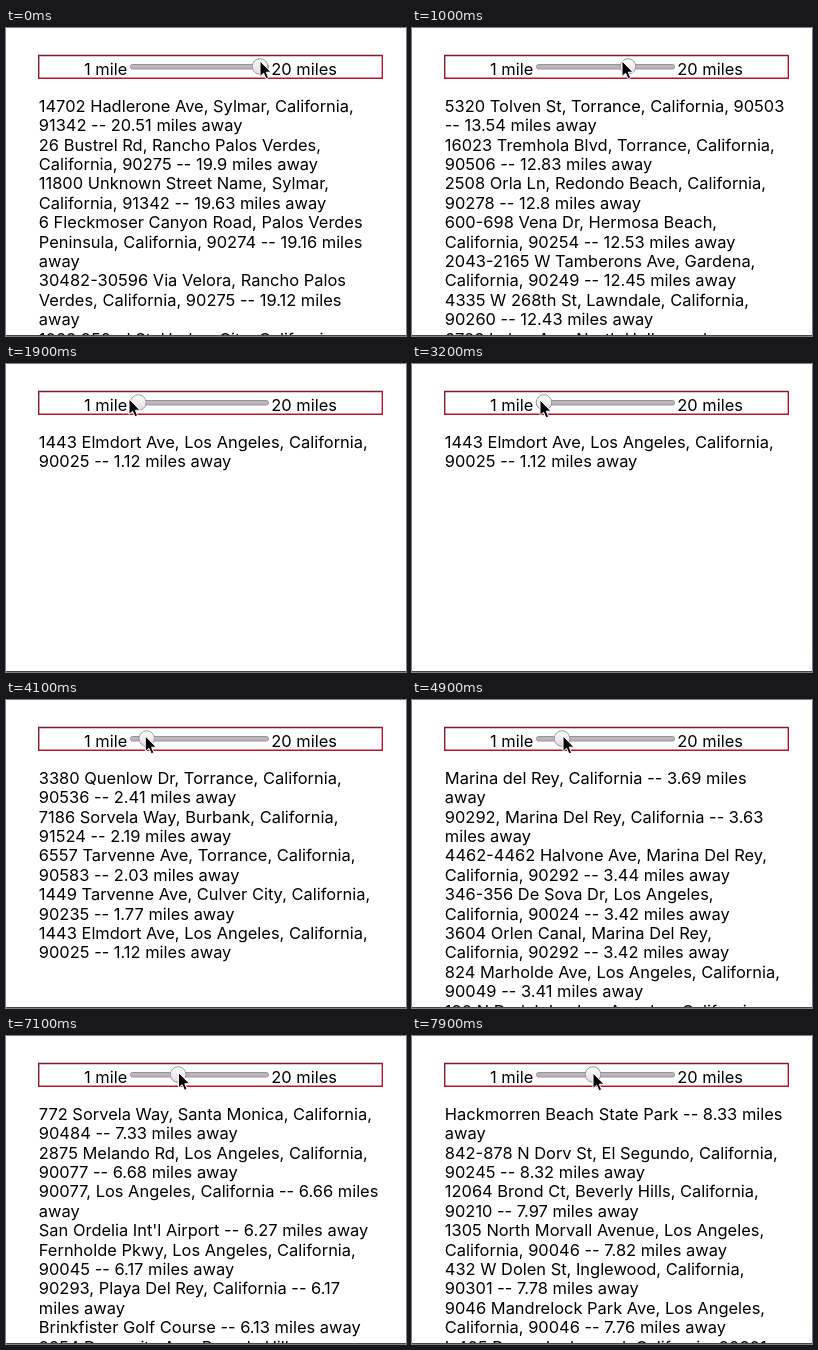
An HTML page that plays this animation: 400 px wide and 308 px high, repeating every 8 s.

```html
<!DOCTYPE html>
<html lang="en">
<head>
<meta charset="utf-8">
<title>Distance slider</title>
<style>
  html, body { margin: 0; width: 100%; height: 100%; overflow: hidden; background: #fff; }
  body, text { font: 16.45px/19.4px Inter, "Open Sans", sans-serif; color: #000; }
  svg { position: absolute; left: 0; top: 0; }
  #list { position: absolute; left: 32.8px; top: 68.8px; width: 346px; white-space: pre-line; }
</style>
</head>
<body>
<div id="list"></div>
<svg width="400" height="308">
  <defs>
    <linearGradient id="knob" x2="0" y2="1">
      <stop stop-color="#fff"/><stop offset="1" stop-color="#dedcdf"/>
    </linearGradient>
  </defs>
  <path d="M32.7 50.5V27.5H376.5" fill="none" stroke="#7c1c2c" stroke-width="1.4"/>
  <path d="M32 50.3H376.3V27" fill="none" stroke="#b8142a" stroke-width="1.4"/>
  <path d="M0 307.5H400" stroke="#4a4448"/>
  <text x="78" y="46.5">1 mile</text>
  <text x="265.3" y="46.5">20 miles</text>
  <rect x="124.5" y="36.5" width="138" height="4.5" rx="2" fill="#bbb6bb" stroke="#989398"/>
  <circle id="thumb" cy="38.5" r="7.8" fill="url(#knob)" stroke="#9a979b"/>
  <path id="cursor" d="M0 0V15.5L3.6 12.2 6 17.8 8.6 16.7 6.3 11.2H11Z" fill="#000" stroke="#fff"/>
</svg>
<script>
// One place per row; "|" marks a line break.
const rows = `14702 Hadlerone Ave, Sylmar, California,|91342 -- 20.51 miles away
26 Bustrel Rd, Rancho Palos Verdes,|California, 90275 -- 19.9 miles away
11800 Unknown Street Name, Sylmar,|California, 91342 -- 19.63 miles away
6 Fleckmoser Canyon Road, Palos Verdes|Peninsula, California, 90274 -- 19.16 miles|away
30482-30596 Via Velora, Rancho Palos|Verdes, California, 90275 -- 19.12 miles|away
1068 952nd St, Harbor City, California,|90710 -- 18.9 miles away
5320 Tolven St, Torrance, California, 90503|-- 13.54 miles away
16023 Tremhola Blvd, Torrance, California,|90506 -- 12.83 miles away
2508 Orla Ln, Redondo Beach, California,|90278 -- 12.8 miles away
600-698 Vena Dr, Hermosa Beach,|California, 90254 -- 12.53 miles away
2043-2165 W Tamberons Ave, Gardena,|California, 90249 -- 12.45 miles away
4335 W 268th St, Lawndale, California,|90260 -- 12.43 miles away
6728 Lubra Ave, North Hollywood,|California, 91606 -- 12.4 miles away
Hackmorren Beach State Park -- 8.33 miles|away
842-878 N Dorv St, El Segundo, California,|90245 -- 8.32 miles away
12064 Brond Ct, Beverly Hills, California,|90210 -- 7.97 miles away
1305 North Morvall Avenue, Los Angeles,|California, 90046 -- 7.82 miles away
432 W Dolen St, Inglewood, California,|90301 -- 7.78 miles away
9046 Mandrelock Park Ave, Los Angeles,|California, 90046 -- 7.76 miles away
I-405 Ramp, Inglewood, California, 90301|-- 7.74 miles away
2875 Melando Rd, Los Angeles, California,|90077 -- 6.68 miles away
90077, Los Angeles, California -- 6.66 miles|away
San Ordelia Int'l Airport -- 6.27 miles away
Fernholde Pkwy, Los Angeles, California,|90045 -- 6.17 miles away
90293, Playa Del Rey, California -- 6.17|miles away
Brinkfister Golf Course -- 6.13 miles away
9254 Dorvenita Ave, Beverly Hills, California,|90210 -- 6.01 miles away
1846-2874 Florenuta Rd, Los Angeles,|California, 90077 -- 5.96 miles away
Drell Canyon Rd, Los Angeles, California,|90077 -- 5.62 miles away
90077, Los Angeles, California -- 5.48 miles|away
1052 Mirven Way, Beverly Hills, California,|90210 -- 5.33 miles away
8540-8550 Polgrath Ave, Playa Del Rey,|California, 90293 -- 5.27 miles away
622 N Morvenel Dr, Beverly Hills, California,|90210 -- 5.18 miles away
Bordella and Pelm -- 5.1 miles away
Marina del Rey, California -- 3.69 miles|away
90292, Marina Del Rey, California -- 3.63|miles away
4462-4462 Halvone Ave, Marina Del Rey,|California, 90292 -- 3.44 miles away
346-356 De Sova Dr, Los Angeles,|California, 90024 -- 3.42 miles away
3604 Orlen Canal, Marina Del Rey,|California, 90292 -- 3.42 miles away
824 Marholde Ave, Los Angeles, California,|90049 -- 3.41 miles away
180 N Drelch Ln, Los Angeles, California,|90049 -- 3.4 miles away
1443 Elmdort Ave, Los Angeles, California,|90025 -- 1.12 miles away`;

const streets = ["Tarvenne Ave", "Ondrel St", "W Halmory Blvd", "Quenlow Dr", "Sorvela Way", "N Pradmere Rd", "Ulvane Ct"];
const cities = ["Los Angeles, California, 900", "Culver City, California, 902", "Santa Monica, California, 904", "Torrance, California, 905", "Burbank, California, 915"];

const places = rows.split("\n").map(row => ({
  text: row.replaceAll("|", "\n"),
  miles: +row.match(/-- ([\d.]+)/)[1]
}));

// Fill the wide gaps between the listed places.
let seed = 7;
const rand = n => (seed = seed * 16807 % 2147483647) % n;
for (let i = places.length - 1; i > 0; i--) {
  const high = places[i - 1].miles;
  for (let m = places[i].miles + .65; m < high - .1; m += .15 + rand(14) / 100) {
    const address = `${200 + rand(9700)} ${streets[rand(7)]}, ${cities[rand(5)]}${10 + rand(80)}`;
    places.push({ text: `${address} -- ${+m.toFixed(2)} miles away`, miles: m });
  }
}
places.sort((a, b) => b.miles - a.miles);

// time, slider miles, cursor x, cursor y
const keys = [
  [0, 20.6, 254, 33], [1000, 14.14, 210, 33], [1400, 6.72, 158, 33],
  [1800, 1.4, 124, 34], [2000, 1, 122, 36], [2400, 1, 124, 38],
  [2600, 1.15, 125, 40], [2800, 1.15, 112, 50], [2900, 1.15, 109, 56],
  [3200, 1.15, 128, 36], [3500, 1.15, 130, 36], [3600, 1.6, 132, 36],
  [4900, 3.94, 151, 36], [6300, 5.98, 164, 36], [7900, 8.73, 181, 37]
];

function pose(t) {
  const i = Math.max(1, keys.findIndex(k => k[0] >= t));
  const a = keys[i - 1], b = keys[i];
  const p = (t - a[0]) / (b[0] - a[0]);
  return a.map((v, j) => v + (b[j] - v) * p);
}

const [list, thumb, cursor] = ["list", "thumb", "cursor"].map(id => document.getElementById(id));
const start = performance.now();
let last = -1;

function draw() {
  const t = Math.floor((performance.now() - start) % 8000 / 100) * 100;
  if (t !== last) {
    last = t;
    const [, miles, x, y] = pose(t);
    thumb.setAttribute("cx", Math.min(254, 131 + (miles - 1) * 6.47));
    cursor.setAttribute("transform", `translate(${x} ${y})`);
    list.textContent = places.filter(p => p.miles <= miles + 1e-6)
      .slice(0, 13).map(p => p.text).join("\n");
  }
  requestAnimationFrame(draw);
}
draw();
</script>
</body>
</html>
```
